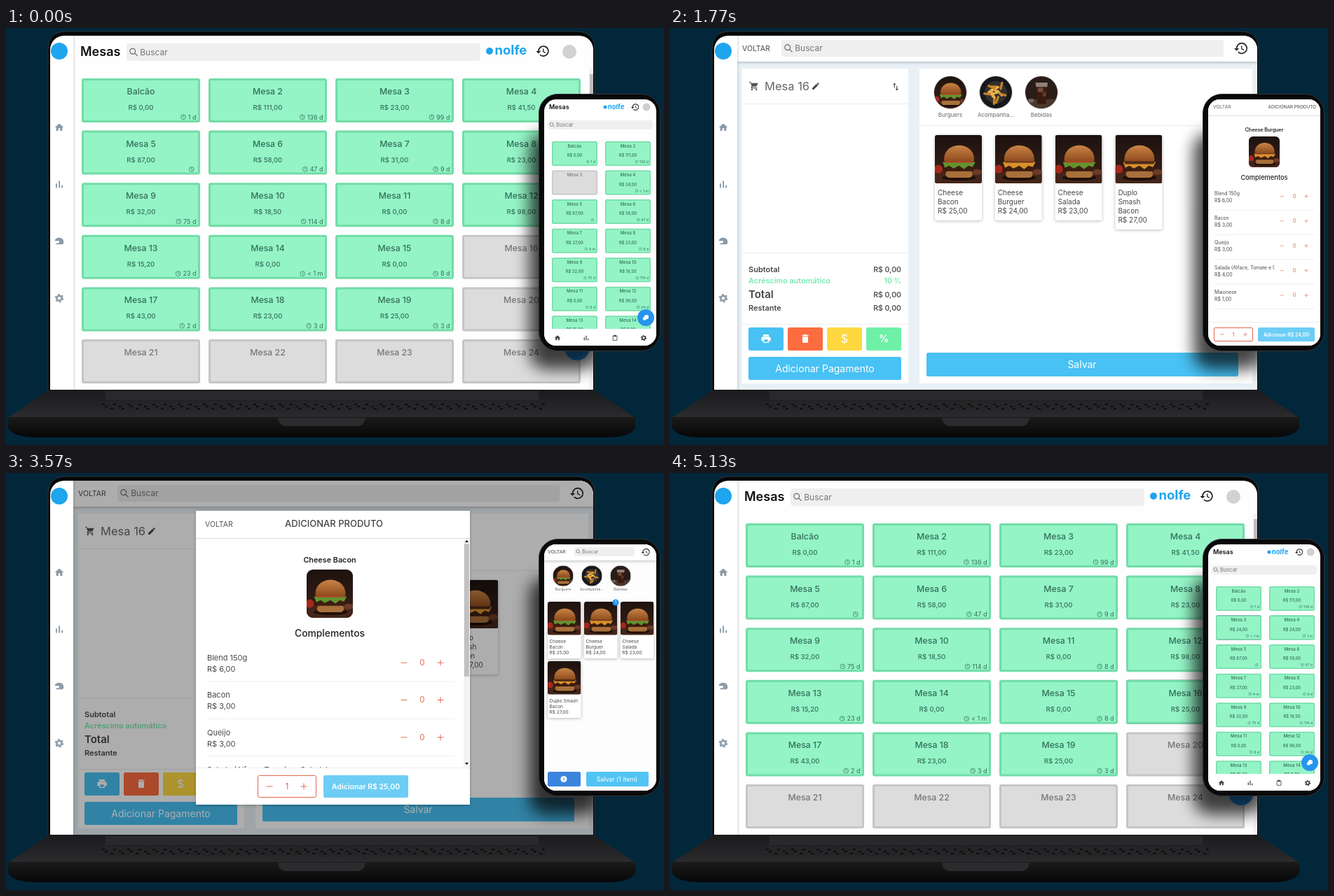
These frames come from a looping animation (939 px wide and 596 px high, 5400 ms). An HTML page:

```html
<!DOCTYPE html>
<html lang="pt">
<head>
<meta charset="utf-8">
<title>Mesas</title>
<style>
html, body { margin: 0; width: 100%; height: 100%; overflow: hidden; background: #02273b; }
svg { display: block; font-family: Inter, sans-serif; }
#stage { width: 100%; height: 100%; }
.sh { filter: drop-shadow(0 1px 2px #0004); }
</style>
</head>
<body>
<script>
const BLUE = '#48c1f4', SKY = '#6dcdf5', RED = '#e2684a', INK = '#484848', BRAND = '#1fa4ee';

// ---------- drawing helpers ----------
const text = (x, y, size, s, fill = INK, weight = 400, anchor = 'start') =>
  `<text x="${x}" y="${y}" font-size="${size}" fill="${fill}" font-weight="${weight}" text-anchor="${anchor}">${s.replace('<', '&lt;')}</text>`;
const mid = (x, y, size, s, fill, weight) => text(x, y, size, s, fill, weight, 'middle');
const end = (x, y, size, s, fill, weight) => text(x, y, size, s, fill, weight, 'end');
const rect = (x, y, w, h, fill, r = 0, more = '') =>
  `<rect x="${x}" y="${y}" width="${w}" height="${h}" rx="${r}" fill="${fill}" ${more}/>`;
const disc = (x, y, r, fill) => `<circle cx="${x}" cy="${y}" r="${r}" fill="${fill}"/>`;
const line = (x1, x2, y, c = '#ececec') => rect(x1, y, x2 - x1, 1, c);
const group = (id, body) => `<g id="${id}">${body}</g>`;
const pen = document.createElement('canvas').getContext('2d');
pen.font = '100px Inter, sans-serif';
const widthOf = (s, size) => pen.measureText(s).width * size / 100;

const P = d => `<path d="${d}"/>`;
const S = (d, w = 2) => `<path d="${d}" fill="none" stroke="currentColor" stroke-width="${w}"/>`;
const ICONS = {
  home: P('M10 20v-6h4v6h5v-8h3L12 3 2 12h3v8z'),
  bars: P('M4 10h3v10H4zM10.500 4h3v16h-3zM17 14h3v6h-3z'),
  helmet: P('M2 11c0-4 4-7 10-7s10 4 10 9-2 6-4 6H5l-1-2 6-1c3-1 3-5 0-5z'),
  gear: '<circle cx="12" cy="12" r="5.500" fill="none" stroke="currentColor" stroke-width="4"/>' +
    '<circle cx="12" cy="12" r="8.500" fill="none" stroke="currentColor" stroke-width="3" stroke-dasharray="4.450"/>',
  search: S('M15 15l6 6M16 10a6.500 6.500 0 1 1-13 0 6.500 6.500 0 0 1 13 0z'),
  history: P('M13 3a9 9 0 0 0-9 9H1l4 4 4-4H6a7 7 0 1 1 2 5l-1.400 1.400A9 9 0 1 0 13 3zm-1 5v5l4.300 2.500.7-1.200-3.500-2V8z'),
  clock: S('M21 12a9 9 0 1 1-18 0 9 9 0 0 1 18 0zM12 6v6l4 2'),
  cart: P('M7 18a2 2 0 1 0 0 4 2 2 0 0 0 0-4zM17 18a2 2 0 1 0 0 4 2 2 0 0 0 0-4zM1 2v2h2l3.600 7.600L5 14.500C4.500 16 5.500 17 7 17h12v-2H7.500l1-2H16l2-1 3-7H5.200l-1-3z'),
  pencil: P('M3 17.200V21h3.800l11-11-3.700-3.800zM20.700 7a1 1 0 0 0 0-1.400l-2.300-2.300a1 1 0 0 0-1.400 0l-1.800 1.800 3.700 3.700z'),
  swap: P('M16 17v-7h-2v7h-3l4 4 4-4zM9 3 5 7h3v7h2V7h3z'),
  print: P('M19 8H5a3 3 0 0 0-3 3v6h4v4h12v-4h4v-6a3 3 0 0 0-3-3zM16 19H8v-5h8zM18 3H6v4h12z'),
  trash: P('M6 19a2 2 0 0 0 2 2h8a2 2 0 0 0 2-2V7H6zM19 4h-3.500l-1-1h-5l-1 1H5v2h14z'),
  clip: S('M5 5h14v15H5z') + P('M8 2h8v6H8z'),
  chat: '<circle cx="14" cy="10" r="7"/><circle cx="8" cy="15" r="5"/>',
  minus: S('M3 12h18'),
  plus: S('M3 12h18M12 3v18')
};
const icon = (name, x, y, size, c) =>
  `<g transform="translate(${x - size / 2} ${y - size / 2}) scale(${size / 24})" fill="${c}" color="${c}">${ICONS[name]}</g>`;

// ---------- food pictures (66 x 68 units) ----------
const ell = (x, y, rx, ry, c) => `<ellipse cx="${x}" cy="${y}" rx="${rx}" ry="${ry}" fill="${c}"/>`;
function food(kind) {
  if (kind == 'fries') {
    let s = rect(0, 0, 66, 68, '#17181c') + disc(33, 34, 23, '#33302c');
    for (let i = 0; i < 14; i++)
      s += rect(20 + i * 11 % 23, 20 + i * 7 % 22, 17, 4.5, i % 2 ? '#eab04a' : '#c9822b', 2, `transform="rotate(${i * 47} 33 34)"`);
    return s;
  }
  if (kind == 'drink')
    return rect(0, 0, 66, 68, '#2a1c17') + rect(0, 48, 66, 20, '#4a382d') +
      '<path d="M21 14h25l-4 44H25z" fill="#3a1a10"/><path d="M21 14h25l-1 9H22z" fill="#8f8078"/>' +
      ell(31, 29, 6, 5, '#774a32') + ell(39, 38, 4, 5, '#623b29') + ell(12, 51, 6, 4, '#75655a');
  const cheese = kind == 1 || kind == 3;
  return rect(0, 0, 66, 68, 'url(#wood)') + rect(0, 51, 66, 17, '#432519') +
    disc(5, 48, 6, '#a5281b') + ell(59, 52, 7, 4, '#6b3a28') + ell(34, 60, 24, 4, '#1f0f09') +
    rect(15, 50, 38, 10, '#a8703a', 5) + rect(13, 43, 42, 8, '#3c1d10', 3) +
    `<path d="M11 38h46l-4 7-6-2-6 5-7-5-8 4-6-4-6 3z" fill="${cheese ? '#d9902a' : '#62932f'}"/>` +
    (kind == 3 ? rect(13, 37, 42, 4, '#4d2a19', 2) : rect(14, 36, 40, 3, cheese ? '#6f3420' : '#b04228', 1)) +
    '<path d="M13 37C10 7 58 7 55 37z" fill="url(#bun)"/>';
}
let clips = 0;
function pic(kind, x, y, w, h, r) {
  const id = 'c' + clips++;
  return `<clipPath id="${id}">${rect(x, y, w, h, '#000', r)}</clipPath><g clip-path="url(#${id})">` +
    `<svg x="${x}" y="${y}" width="${w}" height="${h}" viewBox="0 0 66 68" preserveAspectRatio="xMidYMid slice">${food(kind)}</svg></g>`;
}

// ---------- shared screen parts ----------
const TONES = {
  green: ['#94f4c6', '#72dca7', '#34705a'],
  grey: ['#dcdcdc', '#c6c6c6', '#777'],
  purple: ['#a084e4', '#8669cf', '#51418a']
};
const WIDE = { x: 108, dx: 181, w: 169, y: 72, dy: 74.6, h: 63, cols: 4, b: 3, name: [23, 12.3], price: [45, 9.6], time: [58.500, 9, 5.5] };
const SLIM = { x: 779, dx: 76, w: 65, y: 162, dy: 41.55, h: 35, cols: 2, b: 1.5, name: [8.5, 6.2], price: [22, 5.8], time: [31, 5.2, 3] };

function table(g, n, price, time, tone = price ? 'green' : 'grey', hint) {
  const x = g.x + (n - 1) % g.cols * g.dx, y = g.y + Math.floor((n - 1) / g.cols) * g.dy;
  const [fill, edge, ink] = TONES[tone], cx = x + g.w / 2, right = x + g.w - g.time[2];
  let s = rect(x + g.b / 2, y + g.b / 2, g.w - g.b, g.h - g.b, fill, 1.5, `stroke="${edge}" stroke-width="${g.b}"`);
  if (hint) return s + hint.map((h, i) => mid(cx, y + g.h / 2 + 3 + (i - (hint.length - 1) / 2) * 9, g.price[1], h, '#858585', 500)).join('');
  s += mid(cx, y + g.name[0], g.name[1], n > 1 ? 'Mesa ' + n : 'Balcão', ink, 500);
  if (price) s += mid(cx, y + g.price[0], g.price[1], 'R$ ' + price, ink, 500);
  if (time != null) {
    const size = g.time[1];
    s += end(right, y + g.time[0], size, time, ink) +
      icon('clock', right - widthOf(time, size) - size * .75, y + g.time[0] - size * .36, size, ink);
  }
  return s;
}
const tables = (g, data) => data.split(';').map((d, i) => table(g, i + 1, ...d.split('|'))).join('');

const search = (x, y, w, h, size) => rect(x, y, w, h, '#efefef', 4) +
  icon('search', x + size * .85, y + h / 2, size * 1.2, '#666') + text(x + size * 1.6, y + h / 2 + size * .36, size, 'Buscar', '#777');
const brand = (x, y, r, size) => disc(x, y, r, BRAND) + text(x + r * 1.5, y + size * .27, size, 'nolfe', BRAND, 700);
const button = (x, y, w, h, fill, label, size, weight) =>
  rect(x, y, w, h, fill, 2.5) + (label ? mid(x + w / 2, y + h / 2 + size * .36, size, label, '#fff', weight) : '');
const stepper = (xs, y, size, n) => icon('minus', xs[0], y, size, RED) + mid(xs[1], y + size * .33, size, n, RED) + icon('plus', xs[2], y, size, RED);

const EXTRAS = [['Blend 150g', '6,00'], ['Bacon', '3,00'], ['Queijo', '3,00'], ['Salada (Alface, Tomate e Cebola)', '4,00'], ['Maionese', '1,00']];
const extras = (n, x, right, y, step, size, gap, xs, dy) => EXTRAS.slice(0, n).map(([name, cost], i) => {
  const b = y + i * step;
  return text(x, b, size, name) + text(x, b + gap, size, 'R$ ' + cost) + line(x, right, b + gap + dy, '#efefef') +
    rect(xs[0] - size * 1.5, b - size, right - xs[0] + size * 2, gap + size, '#fff') + stepper(xs, b + gap * .2, size * 1.05, '0');
}).join('');

const product = (kind, x, y, w, ih, h, lines, size, gap) => `<g class="sh">${rect(x, y, w, h, '#fff', 3)}</g>` +
  pic(kind, x, y, w, ih, 3) + lines.map((s, i) => text(x + size * .4, y + ih + size * 1.7 + i * gap, size, s)).join('');
const CATS = [[0, 'Burguers'], ['fries', 'Acompanha...'], ['drink', 'Bebidas']];
const cats = (x, dx, y, r, size, ly) => CATS.map(([k, s], i) =>
  disc(x + i * dx, y, r + 1, '#ddd') + pic(k, x + i * dx - r, y - r, 2 * r, 2 * r, r) + mid(x + i * dx, ly, size, s, '#666')).join('');

// ---------- laptop ----------
const wideTables = rect(96, 11, 743, 507, '#fefefe') + text(106, 40, 18, 'Mesas', '#111', 600) +
  search(172, 22, 505, 25, 12) + brand(690, 33, 5, 18.5) + icon('history', 766, 33, 21, '#222') + disc(804, 34, 10, '#d2d2d2') +
  rect(832, 58, 6, 460, '#f3f3f3') + rect(833, 66, 5, 190, '#bdbdbd') +
  tables(WIDE, '0,00|1 d;111,00|136 d;23,00|99 d;41,50;87,00|;58,00|47 d;31,00|9 d;23,00;32,00|75 d;18,50|114 d;0,00|8 d;98,00;15,20|23 d;0,00|< 1 m;0,00|8 d;;43,00|2 d;23,00|3 d;25,00|3 d;;;;;') +
  group('wHint', table(WIDE, 16, '', null, 'grey', ['Toque para abrir mesa'])) +
  group('wBusy', table(WIDE, 16, '0,00', null, 'purple')) +
  group('wDone', table(WIDE, 16, '25,00')) + disc(815, 457, 18, '#2196f3');

const totals = (a, b) => end(330, 349, 10.5, 'R$ ' + a, '#555', 600) + end(330, 385, 10.5, 'R$ ' + b, '#555', 600) + end(330, 404, 10.5, 'R$ ' + b, '#555', 600);
const save = (id, label) => group(id, mid(588, 486, 14, label, '#fff'));
const wideOrder = rect(96, 11, 743, 507, '#e9f1f6') +
  `<g class="sh">${rect(96, 11, 743, 37, '#fff')}</g>` + text(103, 33, 10.5, 'VOLTAR') + search(159, 17, 631, 24, 12) + icon('history', 815, 29, 22, '#333') +
  rect(103, 58, 237, 450, '#fff') + icon('cart', 120, 83, 15, '#555') + text(135, 89, 16.5, 'Mesa 16', '#666') + icon('pencil', 208, 83, 13, '#444') + icon('swap', 322, 84, 14, '#444') +
  line(103, 340, 108) + line(103, 340, 321) + line(103, 340, 423) +
  text(112, 349, 11, 'Subtotal', INK, 600) + text(112, 365, 10.8, 'Acréscimo automático', '#77e8ac', 600) + end(330, 365, 10.5, '10 %', '#77e8ac', 600) +
  text(112, 386, 15, 'Total', '#444', 600) + text(112, 404, 11, 'Restante', INK, 600) +
  group('empty', totals('0,00', '0,00')) +
  group('filled', totals('25,00', '27,50') + rect(103, 109, 237, 20, '#fdd23c') + text(112, 123, 9.5, 'NOVOS', '#fff') +
    rect(112, 139, 15, 15, '#777', 2) + mid(119.5, 150, 9, '1', '#fff') + text(130, 150, 10, 'Cheese Bacon') + end(330, 151, 10.5, 'R$ 25,00', '#555', 500)) +
  [BLUE, '#fb6c3f', '#fdd83f', '#6ff0a7'].map((c, i) => button(112 + i * 56, 428, 50, 33, c)).join('') +
  icon('print', 137, 444, 16, '#fff') + icon('trash', 193, 444, 16, '#fff') + mid(249, 450, 16, '$', '#fff') + mid(305, 449, 14, '%', '#fff', 600) +
  button(112, 470, 218, 33, BLUE, 'Adicionar Pagamento', 14) +
  rect(356, 58, 475, 450, '#fff') + cats(400, 65, 92, 23, 8, 127) + line(356, 831, 139) +
  [['Cheese', 'Bacon', 'R$ 25,00'], ['Cheese', 'Burguer', 'R$ 24,00'], ['Cheese', 'Salada', 'R$ 23,00'], ['Duplo', 'Smash', 'Bacon', 'R$ 27,00']]
    .map((l, i) => product(i, 378 + i * 85.8, 153, 67, 69, 83 + l.length * 13, l, 10, 13)).join('') +
  group('press', rect(378, 153, 67, 122, '#000', 3, 'opacity=".09"')) +
  rect(366, 464, 445, 34, BLUE, 2.5) + save('wSave', 'Salvar') + save('wSave1', 'Salvar (1 item)');

const wideModal = `<g class="sh">${rect(271, 54, 391, 420, '#fff')}</g>` +
  '<clipPath id="rows"><rect x="271" y="94" width="391" height="327"/></clipPath><g clip-path="url(#rows)">' +
  mid(462, 128, 10.8, 'Cheese Bacon', '#222', 600) + pic(0, 429, 138, 66, 69, 9) + mid(462, 234, 13.8, 'Complementos', '#222', 500) +
  extras(3, 287, 640, 268, 53.3, 11, 16, [568, 594, 620], 13.5) + text(287, 428, 11, EXTRAS[3][0]) + '</g>' +
  text(284, 77, 10.5, 'VOLTAR', '#555') + mid(468, 77, 13, 'ADICIONAR PRODUTO', '#444', 500) + line(271, 662, 93, '#dcdcdc') +
  rect(653, 95, 8, 325, '#f2f2f2') + rect(654, 101, 7, 190, '#c1c1c1') + P('M655 99l2.500-3 2.500 3zM655 414l2.500 3 2.500-3z') +
  line(271, 662, 421) + rect(359.500, 432.500, 83, 31, 'none', 2, `stroke="${RED}"`) + stepper([376, 401, 425], 448, 12, '1') +
  button(453, 432, 121, 32, SKY, 'Adicionar R$ 25,00', 10.5, 600);

const sidebar = rect(96, 11, 4, 507, 'url(#edge)') + rect(63, 11, 33, 507, '#fff') + disc(76, 33, 12, BRAND) +
  ['home', 'bars', 'helmet', 'gear'].map((n, i) => icon(n, 76, 142 + i * 81.4, 15, '#8b9aa6')).join('');

let keys = '';
for (let i = 0; i < 106; i++) keys += rect(137 + i * 6 - i % 2 * 2, 537 + i % 3 * 3, 4, 2, '#0c0c0d');
const body = '<path d="M60 519V31Q60 5 86 5H814Q840 5 840 31V519z" fill="#060607" stroke="#30353a"/>';
const base = '<path d="M62 517H838L898 557H3z" fill="url(#deck)"/>' + rect(142, 519, 618, 13, '#29292b') +
  '<path d="M142 534H760L772 546H130z" fill="#252527"/>' + keys +
  '<path d="M3 556H898V572Q890 585 858 585H44Q10 585 3 572z" fill="url(#slab)"/>' +
  '<path d="M388 557H513Q512 569 500 569H401Q389 569 388 557z" fill="#2b2b2d"/>';

// ---------- phone ----------
const slimTables = rect(766, 100, 164, 358, '#fefefe') + text(775, 116, 9, 'Mesas', '#111', 600) + brand(855, 113, 2.5, 9.5) +
  icon('history', 898, 113, 13, '#222') + disc(914, 113, 5.5, '#cfcfcf') + search(773, 132, 150, 13, 7.5) +
  tables(SLIM, '0,00|1 d;111,00|136 d;;24,00|< 1 m;87,00|;58,00|47 d;27,00|4 m;23,00|9 d;32,00|75 d;18,50|114 d;0,00|8 d;98,00|24 d;15,20|23 d;0,00|< 1 m') +
  group('sHint', table(SLIM, 3, '', null, 'grey', ['Toque para abrir', 'mesa'])) +
  group('sBusy', table(SLIM, 3, '0,00', null, 'purple')) +
  group('sDone', table(SLIM, 3, '24,00', '< 1 m') + table(SLIM, 4, '24,00', '1 m')) +
  rect(766, 430, 164, 28, '#fff') + ['home', 'bars', 'clip', 'gear'].map((n, i) => icon(n, 787 + i * 41, 443, 10, '#444')).join('') +
  disc(913, 414, 12, '#2794ee') + icon('chat', 913, 414, 11, '#fff');

const slimOrder = rect(766, 100, 164, 358, '#fdfdfd') + `<g class="sh">${rect(766, 100, 164, 25, '#fff')}</g>` +
  text(773, 115, 6.8, 'VOLTAR') + search(811, 106, 86, 13, 7) + icon('history', 913, 113, 14, '#333') + cats(795, 41, 147, 14.5, 5.2, 168) +
  [['Cheese', 'Bacon', 'R$ 25,00'], ['Cheese', 'Burguer', 'R$ 24,00'], ['Cheese', 'Salada', 'R$ 23,00'], ['Duplo Smash', 'Bacon', 'R$ 27,00']]
    .map((l, i) => product(i, 773 + i % 3 * 52, i < 3 ? 184 : 269, 47.5, 47.5, 81, l, 6.5, 8)).join('') +
  group('badge', disc(870, 185, 4.5, '#2196f3') + mid(870, 187, 5.5, '1', '#fff')) +
  button(773, 427, 47, 21, '#3b84dd') + disc(796, 437.500, 4.5, '#fff') + mid(796, 440, 7, 'i', '#3b84dd', 700) +
  rect(828, 427, 89, 21, '#52c4f3', 2) + group('sSave', mid(872, 440.500, 8.8, 'Salvar', '#fff')) + group('sSave1', mid(872, 440.500, 8.8, 'Salvar (1 item)', '#fff'));

const slimModal = rect(766, 100, 164, 358, '#fff') + text(775, 115, 6.8, 'VOLTAR', '#666') + end(922, 115, 6.4, 'ADICIONAR PRODUTO', '#444') + line(766, 930, 125, '#ddd') +
  mid(848, 148, 7, 'Cheese Burguer', '#222', 600) + pic(1, 826, 155, 44, 44, 6) + mid(848, 217, 9.3, 'Complementos', '#222', 500) +
  extras(5, 777, 920, 238.5, 35.4, 6.9, 10, [873, 891, 908], 11) +
  line(766, 930, 420) + rect(776.500, 428.500, 55, 19, 'none', 1.5, `stroke="${RED}"`) + stepper([788, 804, 821], 438, 8, '1') +
  button(839, 428, 81, 20, SKY, 'Adicionar R$ 24,00', 7, 600);

const grad = (id, a, b, dir = 'x2="0" y2="1"') => `<linearGradient id="${id}" ${dir}><stop stop-color="${a}"/><stop offset="1" stop-color="${b}"/></linearGradient>`;
document.body.innerHTML = `<svg id="stage" viewBox="0 0 939 596"><defs>
  ${grad('wood', '#1d120f', '#3a2118')}${grad('bun', '#c98445', '#8f4c1f')}${grad('deck', '#1b1b1d', '#2b2b2d')}${grad('slab', '#1a1a1b', '#070708')}${grad('edge', '#0000001c', '#00000000', '')}
  <clipPath id="wide">${rect(63, 11, 775, 528, '#000', 20)}</clipPath>
  <clipPath id="slim">${rect(768, 102, 160, 352, '#000', 17)}</clipPath>
  <filter id="soft" x="-50%" y="-20%" width="200%" height="140%"><feGaussianBlur stdDeviation="11"/></filter></defs>
  ${rect(0, 0, 939, 596, '#02273b')}${body}
  <g clip-path="url(#wide)">${wideTables}${group('wOrder', wideOrder)}${group('wDim', rect(96, 11, 743, 507, '#000'))}${group('wModal', wideModal)}${group('wBlink', rect(96, 11, 743, 507, '#000'))}${sidebar}
  ${rect(747, 150, 100, 338, '#000', 24, 'opacity=".72" filter="url(#soft)"')}</g>${base}
  ${rect(760.500, 94.500, 173, 367, '#09090a', 27, 'stroke="#303337"')}
  <g clip-path="url(#slim)">${slimTables}${group('sOrder', slimOrder)}${group('sDim', rect(766, 100, 164, 358, '#000'))}${group('sModal', slimModal)}</g></svg>`;

// ---------- motion ----------
function bezier(x1, y1, x2, y2) {
  const at = (u, a, b) => 3 * u * (1 - u) ** 2 * a + 3 * u * u * (1 - u) * b + u ** 3;
  return x => {
    let lo = 0, hi = 1;
    for (let i = 0; i < 20; i++) { const m = (lo + hi) / 2; at(m, x1, x2) < x ? lo = m : hi = m; }
    return at(lo, y1, y2);
  };
}
const easeIn = bezier(.36, .66, .04, 1), easeOut = bezier(.47, 0, .745, .715);
const ramp = (t, from, span) => Math.min(1, Math.max(0, (t - from) / span));
const $ = id => document.getElementById(id);
const fade = (id, o) => $(id).setAttribute('opacity', o);

// A page rises while fading in, and sinks while fading out.
function page(id, t, open, close, drop, dim) {
  const p = t <= open ? 0 : easeIn(ramp(t, open, 280));
  const q = t <= close ? 0 : easeOut(ramp(t, close, 200));
  const shown = p >= .999 && q == 0 ? 1 : q >= .999 ? 0 : p * (1 - q);
  fade(id, shown);
  $(id).setAttribute('transform', `translate(0 ${(1 - p + q) * drop})`);
  if (dim) fade(dim, Math.sqrt(shown) * .32);
}

const start = performance.now();
function draw() {
  const t = (performance.now() - start) % 5400;
  page('wOrder', t, 1200, 4105, 27);
  page('wModal', t, 2602, 3650, 27, 'wDim');
  page('sOrder', t, 1100, 4420, 18);
  page('sModal', t, 1390, 3095, 18, 'sDim');
  fade('wBlink', Math.sin(Math.PI * ramp(t, 4080, 300)) * .085);
  fade('sHint', ramp(t, 120, 240));
  fade('wHint', ramp(t, 420, 240));
  fade('wBusy', +(t > 1600));
  fade('wDone', +(t >= 4560));
  fade('sBusy', +(t > 1500));
  fade('sDone', +(t >= 5070));
  fade('press', t < 3650 ? ramp(t, 2370, 200) : 0);
  const wide = +(t >= 3650), slim = +(t >= 3300);
  fade('empty', 1 - wide); fade('filled', wide);
  fade('wSave', 1 - wide); fade('wSave1', wide);
  fade('badge', slim); fade('sSave', 1 - slim); fade('sSave1', slim);
  requestAnimationFrame(draw);
}
draw();
</script>
</body>
</html>
```
